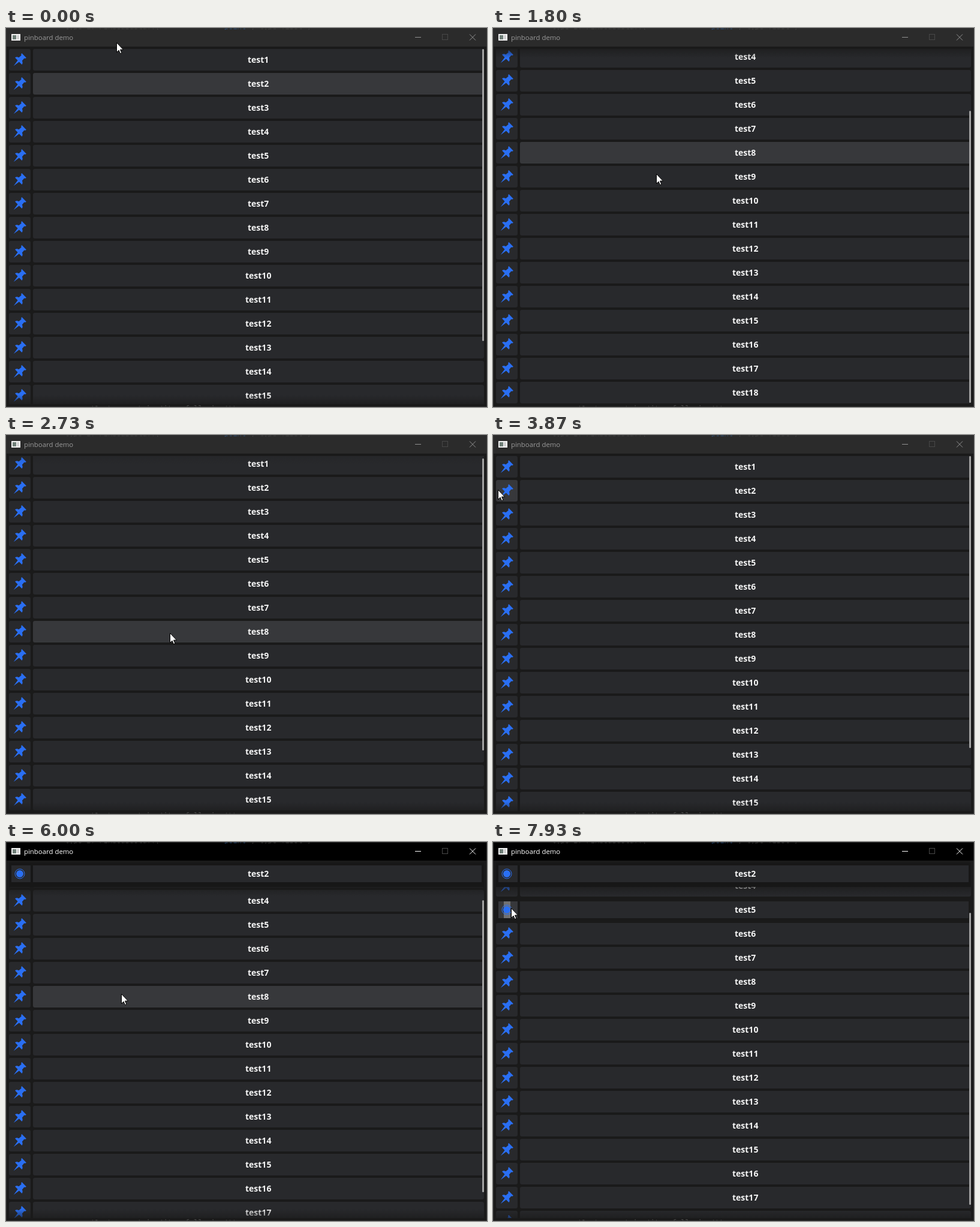
Recreate the animation shown at these times as an HTML page. Size 802 px wide and 632 px high, loop 8000 ms.

```html
<!DOCTYPE html>
<html lang="en">
<head>
<meta charset="utf-8">
<title>pinboard demo</title>
<style>
html, body { margin: 0; width: 100%; height: 100%; overflow: hidden; background: #1a1a1a; }
svg { display: block; }
.label { font: 700 14px "Noto Sans", "Open Sans", sans-serif; fill: #f4f4f4; text-anchor: middle; }
.title { font: 11.4px "Open Sans", "Noto Sans", sans-serif; }
.behind { font: 12px "Noto Sans Mono", monospace; fill: #4a4a4a; white-space: pre; }
</style>
</head>
<body>
<svg id="stage" width="802" height="632" viewBox="0 0 802 632">
  <defs>
    <clipPath id="view"><rect id="viewRect" x="5" y="35" width="792" height="592"/></clipPath>
    <clipPath id="topEdge"><rect width="802" height="3"/></clipPath>
    <linearGradient id="fade" x1="0" y1="0" x2="0" y2="1">
      <stop offset="0" stop-color="#1a1a1a" stop-opacity=".62"/>
      <stop offset="1" stop-color="#1a1a1a" stop-opacity="0"/>
    </linearGradient>
  </defs>
  <rect width="802" height="632" fill="#1a1a1a"/>
  <g id="list" clip-path="url(#view)"></g>
  <rect id="topFade" x="5" width="792" height="15" fill="url(#fade)"/>
  <rect id="bottomFade" x="5" y="-627" width="792" height="15" fill="url(#fade)" transform="scale(1 -1)"/>
  <g id="sticky"><rect x="5" y="35" width="792" height="40" fill="#171717"/></g>
  <rect id="thumb" x="794" width="3" height="487" rx="1.5" fill="#a3a3a3"/>
  <rect id="bar" width="802" height="31"/>
  <g clip-path="url(#topEdge)" opacity=".7">
    <text class="behind" x="98" y="1.5">type if Pinboardstuff(<tspan fill="#2f5f9a" x="364">point</tspan><tspan x="408">, type first )</tspan></text>
  </g>
  <text class="behind" x="140" y="639">(0, type::string(itemsfull.size()) </text>
  <rect x="9" y="10" width="15" height="11" fill="#f2f2f2"/>
  <rect x="11" y="12" width="6" height="7" fill="#6f7f78"/>
  <rect x="18" y="12" width="4" height="7" fill="#d2d2d2"/>
  <text id="caption" class="title" x="30" y="20">pinboard demo</text>
  <path id="controls" d="M682 15.5h10M773 10.5l10 10M783 10.5l-10 10" fill="none"/>
  <rect x="727.5" y="10.5" width="9" height="9" fill="none" stroke="#484848"/>
  <rect x=".5" y=".5" width="801" height="631" fill="none" stroke="#303030"/>
  <path id="cursor" d="M.5 .5V16.5L4.1 13.1 6.5 18.6 8.9 17.6 6.5 12.1H11.5Z" fill="#fff" stroke="#000"/>
</svg>
<script>
const TICKS = 120, PITCH = 40, TOP = 35, COUNT = 18, MAX_SCROLL = 125;
const FIRST_PIN = 64, SECOND_PIN = 119;
const BLUE = '#2a6ff3', BASE = '#28292c', HOT = '#37383b';
const PIN = 'M-5.4-10H5.4Q5.4-7.6 3.4-7L3.9-1.5Q8 0 8 3.2H1.7L0 14.5-1.7 3.2H-8Q-8 0-3.9-1.5L-3.4-7Q-5.4-7.6-5.4-10Z';

// Moves are [start tick, ticks, ...target]; one tick is 1/15 s.
const wheel = [[14, 4, 125], [21, 3, 100], [26, 1, 125], [28, 3, 25], [31, 3, 125],
  [36, 7, 0], [75, 4, 25], [84, 1, 75], [90, 3, 125], [94, 3, 100]];
const pointer = [[1, 5, 500, 60], [6, 7, 290, 165], [14, 6, 272, 243], [28, 5, 273, 334],
  [40, 3, 273, 317], [46, 12, 8, 91], [60, 3, 18, 92], [65, 9, 192, 253],
  [95, 4, 203, 242], [101, 11, 40, 108], [113, 3, 30, 110]];

const easeOut = u => 1 - (1 - u) ** 2.55;
const smooth = u => u * u * (3 - 2 * u);
const $ = id => document.getElementById(id);

function set(el, attrs) {
  for (const name in attrs) el.setAttribute(name, attrs[name]);
}

function make(tag, attrs, parent) {
  const el = document.createElementNS('http://www.w3.org/2000/svg', tag);
  set(el, attrs);
  parent.append(el);
  return el;
}

function show(el, on) {
  el.style.display = on ? '' : 'none';
}

// Value at a tick, with the start and first value of the latest move.
function follow(moves, first, ease, tick) {
  let start = 0, from = first, value = first;
  for (const [at, ticks, ...to] of moves) {
    if (at > tick) break;
    const u = ease(Math.min((tick - at) / ticks, 1));
    start = at;
    from = value;
    value = from.map((v, i) => Math.round(v + (to[i] - v) * u));
  }
  return { start, from, value };
}

function makeRow(n, parent) {
  const g = make('g', {}, parent);
  const row = { n, g, button: make('rect', {}, g), box: make('rect', {}, g) };
  row.glow = make('rect', { x: 18, y: 4, width: 11, height: 28, fill: '#707173' }, g);
  row.pin = make('path', { d: PIN, fill: BLUE, transform: 'translate(23 18) rotate(45)' }, g);
  row.dot = make('g', {}, g);
  make('circle', { cx: 23, cy: 18, r: 8, fill: 'none', stroke: BLUE }, row.dot);
  make('circle', { cx: 23, cy: 18, r: 6, fill: BLUE }, row.dot);
  make('text', { class: 'label', x: 420.7, y: 23 }, g).textContent = 'test' + n;
  return row;
}

function drawRow(row, y, pinned, hover) {
  const inset = pinned ? 4 : 0;
  const shape = { y: inset, height: 36 - 2 * inset, rx: pinned ? 0 : 3 };
  const onPin = hover === -row.n;
  set(row.g, { transform: `translate(0 ${y})` });
  set(row.button, { ...shape, x: 5 + inset, width: 36 - inset, fill: onPin ? HOT : BASE });
  set(row.box, { ...shape, x: 45, width: 752 - inset, fill: hover === row.n ? HOT : BASE });
  show(row.glow, pinned && onPin);
  show(row.pin, !pinned);
  show(row.dot, pinned);
}

// Positive: row body, negative: its pin button, 0: nothing.
function hoverAt(x, y, scroll) {
  if (y < TOP) return 2; // the row the pointer left last
  const pos = y - TOP + scroll;
  if (pos % PITCH >= 36) return 0;
  const n = Math.floor(pos / PITCH) + 1;
  return x < 41 ? -n : x >= 45 ? n : 0;
}

const rows = Array.from({ length: COUNT }, (_, i) => makeRow(i + 1, $('list')));
const header = makeRow(2, $('sticky'));

function render(tick) {
  const turn = follow(wheel, [0], easeOut, tick);
  const move = follow(pointer, [184, 24], smooth, tick);
  const [scroll] = turn.value;
  const [x, y] = move.value;
  const active = tick >= FIRST_PIN;
  const stuck = active && scroll > PITCH;
  const top = stuck ? TOP + PITCH : TOP;
  // A turning wheel carries the highlight along until the pointer moves.
  const seen = move.start >= turn.start ? scroll : turn.from[0];
  const hover = hoverAt(x, y, seen);

  for (const row of rows) {
    const pinned = row.n === 2 && active || row.n === 5 && tick >= SECOND_PIN;
    drawRow(row, TOP + (row.n - 1) * PITCH - scroll, pinned, hover);
  }
  drawRow(header, TOP, true, hover);
  show($('sticky'), stuck);
  set($('viewRect'), { y: top, height: 627 - top });
  set($('topFade'), { y: top, opacity: Math.min(scroll / 20, 1) });
  set($('bottomFade'), { opacity: Math.min((MAX_SCROLL - scroll) / 20, 1) });
  set($('thumb'), { y: Math.round(TOP + scroll * .826) });
  set($('bar'), { fill: active ? '#000' : '#2b2b2b' });
  set($('caption'), { fill: active ? '#fff' : '#999' });
  set($('controls'), { stroke: active ? '#fff' : '#929292' });
  set($('cursor'), { transform: `translate(${x} ${y})` });
}

const start = performance.now();
function loop(now) {
  const ms = Math.max(0, now - start) % 8000;
  render(Math.floor(ms * 15 / 1000 + .07) % TICKS);
  requestAnimationFrame(loop);
}
render(0);
requestAnimationFrame(loop);
</script>
</body>
</html>
```
